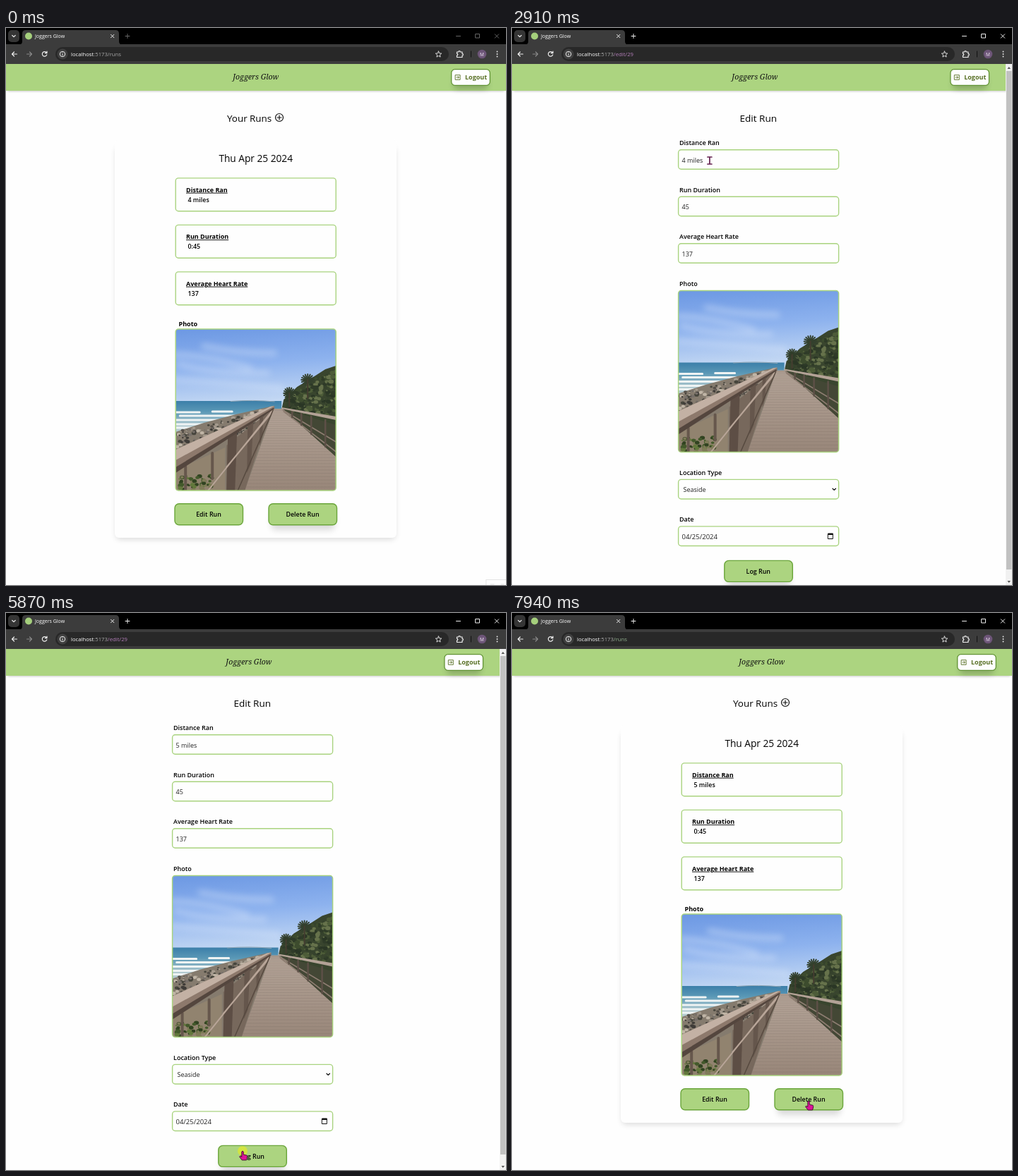
Write an HTML page that moves like this. It is 708 px wide and 790 px high and loops after 8 s.

```html
<!DOCTYPE html>
<html lang="en">
<head>
<meta charset="utf-8">
<title>Joggers Glow</title>
<style>
html, body { margin: 0; width: 100%; height: 100%; overflow: hidden; background: #fefefe; }
svg { display: block; width: 100%; height: 100%; font-family: "Open Sans", "Noto Sans", sans-serif; }
text { white-space: pre; }
.brand { font-family: "Noto Serif", serif; font-style: italic; }
.line { fill: none; stroke-linecap: round; stroke-linejoin: round; }
</style>
</head>
<body>
<svg id="stage" viewBox="0 0 708 790"></svg>
<script>
const LOOP = 8000;
const GREEN = '#acd480';
const NAME = 'Joggers Glow';

// ---- drawing helpers ----
const rect = (x, y, w, h, fill, r = 0, extra = '') =>
  `<rect x="${x}" y="${y}" width="${w}" height="${h}" rx="${r}" fill="${fill}" ${extra}/>`;
const poly = (points, fill, extra = '') => `<polygon points="${points}" fill="${fill}" ${extra}/>`;
const line = (d, color, width = 1, extra = '') =>
  `<path class="line" d="${d}" stroke="${color}" stroke-width="${width}" ${extra}/>`;
const text = (x, y, size, weight, str, extra = '') =>
  `<text x="${x}" y="${y}" font-size="${size}" font-weight="${weight}" ${extra}>${str}</text>`;
const centered = (x, y, size, weight, str, extra = '') =>
  text(x, y, size, weight, str, 'text-anchor="middle" ' + extra);
const group = (id, content, extra = '') => `<g id="${id}" ${extra}>${content}</g>`;
const shadow = (x, y, w, h, blur, alpha) =>
  rect(x, y, w, h, '#000', 5, `opacity="${alpha}" style="filter:blur(${blur}px)"`);
const field = (x, y, h, extra = '') =>
  rect(x, y, 227, h, '#fefefe', 4, `stroke="#a9d37f" stroke-width="1.4" ${extra}`);
const button = (x, y, label, lifted) =>
  (lifted ? shadow(x + 4, y + 10, 89, 27, 5, .15) : '') +
  rect(x, y, 96.5, 30, GREEN, 6, 'stroke="#6aa53a" stroke-width="1.4"') +
  centered(x + 48, y + 18.5, 8.9, 600, label);

let seed = 7;
const random = () => (seed = seed * 16807 % 2147483647) / 2147483647;
const pick = list => list[Math.floor(random() * list.length)];
const repeat = (n, make) => Array.from({ length: n }, (_, i) => make(i)).join('');

// ---- seaside picture, 227 x 229 ----
const DECK = '139,113 152,113 227,181 227,229 98,229';
function seaside() {
  const blob = (x, y, r, color) => `<ellipse cx="${x}" cy="${y}" rx="${r * 1.3}" ry="${r}" fill="${color}"/>`;
  const sky = rect(0, 0, 227, 110, 'url(#sky)') +
    `<g style="filter:blur(5px)" opacity=".4">` +
    line('M0 36Q45 38 105 55M5 50Q60 64 130 62M40 24Q90 35 140 34M0 72Q70 76 150 84', '#dce8fb', 8) + '</g>';
  const sea = rect(0, 102, 150, 60, 'url(#sea)') +
    `<g style="filter:blur(.7px)">` +
    line('M0 118H34M52 117H80M6 123H92M0 129H80M0 135H62M0 140H40', '#eef3f3', 3) + '</g>' +
    line('M78 102.5Q110 100 140 103', '#8fa5b4', 1);
  const shore = poly('0,146 40,133 85,121 138,109 138,160 120,229 0,229', '#857b6e') +
    repeat(190, () => {
      const x = random() * 130;
      return blob(x, 146 - x * .25 + random() * 26, .8 + random() * 1.8,
        pick(['#3f3c38', '#57514a', '#77706a', '#a59b8e', '#c0b5a6', '#47463d']));
    }) +
    poly('0,200 70,168 70,229 0,229', '#91836f') +
    repeat(60, () => blob(5 + random() * 48, 208 + random() * 21, 1 + random() * 2, pick(['#43592b', '#62783c', '#314321', '#7f7b58'])));
  const hill = poly('150,114 153,100 172,82 198,66 212,57 227,52 227,190', '#39452e') +
    repeat(260, () => {
      const x = 156 + random() * 72;
      const top = 100 - (x - 150) * .62;
      return blob(x, top + random() * (122 - top), 1 + random() * 2.2,
        pick(['#2a3625', '#35422c', '#3d4c2e', '#4d5c38', '#66724b', '#2f3b28']));
    }) +
    repeat(16, i => line(`M187 72l${9 * Math.cos(i * .393)} ${8 * Math.sin(i * .393)}`, '#33402d', 2)) +
    repeat(16, i => line(`M161 91l${8 * Math.cos(i * .393)} ${8 * Math.sin(i * .393)}`, '#303d29', 2)) +
    line('M187 72V98M161 91V110', '#443d30', 2);
  const deck = poly(DECK, 'url(#wood)') +
    `<g clip-path="url(#deck)">` +
    repeat(34, i => {
      const y = 114 + 115 * (i / 34) ** 1.5;
      return line(`M90 ${y}H227`, '#74665d', .5, 'opacity=".45"');
    }) + '</g>';
  const rightRail = poly('152,113 227,136 227,181', '#434735') +
    line('M152 115L227 160M153 117L227 174', '#8d7d71', 1.6) +
    line('M165 117V125M178 120V136M192 124V149M212 129V167', '#5d5047', 2.5) +
    poly('150,111 227,124 227,129 150,113', '#b3a296');
  const leftRail =
    poly('138,113 118,165 98,229 72,229 72,165', '#77685c') +
    line('M52 176V212M14 195V229', '#66574c', 4) +
    poly('74,150 87,145 84,229 72,229', '#5d4e45') +
    poly('102,135 110,131 107,190 101,204', '#65564c') +
    poly('119,124 124,121 123,152 119,166', '#65564c') +
    line('M138 114L46 229M138 116L72 196', '#b8a598', 2) +
    line('M138 115L88 229', '#56493f', 1.5) +
    poly('0,171 134,110 140,109 140,113 0,202', '#8d796c') +
    poly('0,171 134,110 140,109 0,186', '#c3b1a4') +
    poly('0,196 138,112 140,113 0,204', '#54463e');
  return sky + sea + shore + hill + deck + rightRail + leftRail;
}

const photo = (x, y) =>
  `<use href="#photo" x="${x}" y="${y}"/>` +
  rect(x, y, 227, 229, 'none', 4, 'stroke="#a9d37f" stroke-width="1.5"');

const defs = `<defs>
  <linearGradient id="sky" x2=".15" y2="1"><stop stop-color="#6c98e3"/><stop offset=".5" stop-color="#8db2ee"/><stop offset="1" stop-color="#c5d9f3"/></linearGradient>
  <linearGradient id="sea" x2="0" y2="1"><stop stop-color="#3c7fa9"/><stop offset=".25" stop-color="#5a98b6"/><stop offset=".6" stop-color="#b4cbd0"/></linearGradient>
  <linearGradient id="wood" x2="0" y2="1"><stop stop-color="#b5a599"/><stop offset="1" stop-color="#988679"/></linearGradient>
  <clipPath id="frame">${rect(0, 0, 227, 229, '#000', 4)}</clipPath>
  <clipPath id="deck">${poly(DECK, '#000')}</clipPath>
  <g id="photo" clip-path="url(#frame)">${seaside()}</g>
</defs>`;

// ---- browser window ----
const browser =
  rect(0, 0, 708, 24, '#000') + rect(0, 23, 708, 28, '#3c3c3c') +
  rect(3, 3, 16, 17, '#353535', 5) + line('M8.8 10.5l2.2 2.2 2.2-2.2', '#eee', 1.2) +
  `<path d="M19 24q4-1 4-5V8q0-5 5-5h127q5 0 5 5v11q0 4 4 5z" fill="#3c3c3c"/>` +
  `<circle cx="32" cy="11.5" r="5" fill="#a5cf7c"/>` +
  text(41, 14.3, 7, 400, NAME, 'fill="#fff"') +
  line('M148.5 9.3l4.4 4.4M152.9 9.3l-4.4 4.4', '#eee') +
  group('controls', line('M169 11.5h6M172 8.5v6M637.5 11.5h6M665 8.5h5.5v5.5h-5.5zM692.3 8.8l5.4 5.4M697.7 8.8l-5.4 5.4', 'currentColor')) +
  line('M15.5 37H8.5M11.5 34l-3 3 3 3', '#eee', 1.2) +
  line('M29.5 37h7M33.5 34l3 3-3 3', '#888', 1.2) +
  line('M57.5 35.2a3.3 3.3 0 1 0 .3 2.6M58 33v2.6h-2.6', '#eee', 1.2) +
  rect(70, 27, 557, 20, '#282828', 10) +
  `<circle cx="80" cy="37" r="7.5" fill="#3f3f3f"/><circle cx="80" cy="37" r="3.7" fill="none" stroke="#eee"/>` +
  line('M80 36.8v2M80 35v.1', '#eee') +
  text(92, 39.8, 7.7, 400, 'localhost<tspan fill="#a8a8a8">:5173</tspan><tspan id="path"></tspan>', 'fill="#fff"') +
  line('M612.5 33l1.2 2.8 3 .3-2.3 2 .7 3-2.6-1.6-2.6 1.6.7-3-2.3-2 3-.3z', '#ddd') +
  line('M638.5 34h2.2a1.3 1.3 0 0 1 2.6 0h2.7v2.4a1.3 1.3 0 0 1 0 2.6v2.5h-7.5v-2.6a1.3 1.3 0 0 0 0-2.6z', '#eee', 1.2) +
  line('M658.5 33v8', '#111') +
  `<circle cx="674" cy="37" r="6.3" fill="#6d5578"/>` + centered(674, 39.5, 6.5, 400, 'M', 'fill="#f2e9f5"') +
  line('M695.5 33.5v.1M695.5 37v.1M695.5 40.5v.1', '#eee', 1.8);

const header = shadow(0, 56, 708, 34, 1.5, .2) + rect(0, 51, 708, 38, GREEN);
const nav = centered(353.7, 73.3, 10.6, 400, NAME, 'class="brand" fill="#111"') +
  shadow(634, 66, 48, 21, 4.5, .2) +
  rect(630.7, 58.7, 54.6, 22.6, '#fefefe', 5, 'stroke="#619334" stroke-width="1.3"') +
  line('M636.5 66.7h6.6v6.6h-6.6zM638 70h3.4M640 68.5l1.5 1.5-1.5 1.5', '#576f23', .9) +
  text(650, 73.4, 9, 700, 'Logout', 'fill="#576f23"');

// ---- pages ----
const stat = (i, label, value, id = '') => {
  const y = 212.9 + i * 66.5;
  return field(240.2, y, 46.8) +
    text(255, y + 19.8, 9, 700, label, 'text-decoration="underline"') +
    text(257.5, y + 34, 8.9, 600, value, `id="${id}"`);
};
const runsPage =
  text(313, 132.6, 13.4, 500, 'Your Runs') +
  `<circle cx="387" cy="127" r="5.5" fill="none" stroke="#111" stroke-width="1.2"/>` +
  line('M384 127h6M387 124v6', '#111', 1.2) +
  shadow(156, 170, 395, 555, 4, .15) + rect(154, 158, 399, 565, '#fefefe', 6) +
  centered(353.7, 189.6, 13.7, 500, 'Thu Apr 25 2024') +
  stat(0, 'Distance Ran', '4 miles', 'ran') + stat(1, 'Run Duration', '0:45') + stat(2, 'Average Heart Rate', '137') +
  text(244.5, 422.6, 9, 700, 'Photo') + photo(240.2, 427) +
  button(239, 674.7, 'Edit Run') + button(372, 674.7, 'Delete Run', true);

const input = (y, label, value, x = 240.5, id = '', fieldId = '') =>
  text(237, y - 6.5, 9, 600, label) + field(235.6, y, 27.6, `id="${fieldId}"`) +
  text(x, y + 18, 9, 400, value, `id="${id}" fill="#222"`);
const editPage =
  centered(348.8, 132.6, 13.5, 500, 'Edit Run') +
  input(172.7, 'Distance Ran', '4 miles', 240.5, 'distance', 'focus') +
  group('selection', rect(241, 181, 5, 12.5, '#3367c8') + text(240.5, 190.7, 9, 400, '4', 'fill="#fff"')) +
  group('caret', line('M246.2 181.5v11', '#222', .8)) +
  input(239.2, 'Run Duration', '45') + input(305.7, 'Average Heart Rate', '137') +
  text(237, 365.7, 9, 600, 'Photo') + photo(235.6, 372.5) +
  input(640.4, 'Location Type', 'Seaside', 242.5) + line('M454 653.2l2.2 2.2 2.2-2.2', '#111', 1.3) +
  input(706.9, 'Date', '<tspan font-size="9.5">04/25/2024</tspan>') +
  line('M447.7 717.5h6.6v7h-6.6z', '#111') + rect(447.5, 716.5, 7, 2.5, '#111') +
  button(300.8, 755.4, 'Log Run', true) +
  rect(699, 51, 9, 739, '#f1f1f1') + rect(700, 61, 7.5, 707, '#c1c1c1') +
  poly('701.5,58 706,58 703.7,55', '#555') + poly('701.5,784 706,784 703.7,787', '#555');

const spinner = repeat(12, i =>
  `<ellipse cx="377.5" cy="177" rx="7.3" ry="3.6" fill="#a6d07a" opacity="${1 - i / 11}" transform="rotate(${-30 * i} 353.7 177)"/>`);

const cursors =
  group('arrow', `<path d="M0 0V11.2L2.6 9 4.3 12.6 6 11.7 4.4 8.2H7.6Z" fill="#cf2a98" stroke="#2b1a2c" stroke-width=".9"/>`) +
  group('ibeam', line('M-3-5H3M0-5V5M-3 5H3', '#64214f', 1.7)) +
  group('hand', `<path d="M-1.2 1Q0-1 1.2 1V5l5 1.3Q7 7 6.4 10L5.5 13H-.8L-4.5 8Q-4 6.5-1.2 8.2Z" fill="#dc1596" stroke="#3a1030" stroke-width=".9"/>`);

const stage = document.getElementById('stage');
stage.innerHTML = defs + rect(0, 0, 708, 790, '#fefefe') +
  group('runs', runsPage) + header + group('nav', nav) + group('edit', editPage) +
  group('spinner', spinner) + browser +
  group('popup', rect(679.8, 782.5, 40, 20, '#fefefe', 0, 'stroke="#e4e4e4"') + line('M686 789h5M701 789h4', '#e4e4e4')) +
  group('ripple', '<circle r="7" fill="#d8e637" opacity=".85"/>') + group('cursor', cursors);

// ---- timeline ----
const at = {};
stage.querySelectorAll('[id]').forEach(el => at[el.id] = el);
const show = (id, on) => at[id].style.display = on ? '' : 'none';
const within = (t, from, to) => t >= from && t < to;

// time, x, y
const route = [
  [270, 643, 783], [620, 480, 742], [1070, 287, 697], [1610, 287, 697], [1880, 274, 672],
  [2290, 276, 507], [2420, 276, 490], [2840, 280, 190], [2910, 280, 188], [3180, 250, 188],
  [3550, 247, 188], [3900, 238, 190], [4080, 238, 190], [4500, 212, 300], [4840, 180, 403],
  [5000, 172, 425], [5300, 235, 600], [5600, 333, 758], [5670, 335, 763], [5940, 335, 763],
  [6500, 225, 589], [6830, 223, 587], [7080, 132, 480], [7280, 180, 348], [7590, 335, 546],
  [7940, 420, 692], [LOOP, 420, 692]
];
function pointer(t) {
  const next = Math.max(1, route.findIndex(p => p[0] > t));
  const [t0, x0, y0] = route[next - 1], [t1, x1, y1] = route[next];
  const k = Math.max(0, (t - t0) / (t1 - t0));
  return [x0 + (x1 - x0) * k, y0 + (y1 - y0) * k];
}
const over = (x, y, left, top, w, h) => x > left && x < left + w && y > top && y < top + h;

function render(t) {
  const editUrl = within(t, 1350, 6080);
  const editing = within(t, 2150, 6080);
  const listing = t < 1350 || t >= 6570;
  const focused = within(t, 3300, 5800);
  const selected = within(t, 3650, 4250);
  const typed = t >= 4400;

  show('popup', t < 70);
  at.controls.style.color = t < 1140 ? '#666' : '#eee';
  at.path.textContent = editUrl ? '/edit/29' : '/runs';
  at.path.setAttribute('fill', editUrl ? '#b47fba' : t < 1350 ? '#a8a8a8' : '#93b390');
  show('runs', listing);
  show('edit', editing);
  at.nav.setAttribute('transform', `translate(${editing ? -9.8 : 0})`);
  at.ran.textContent = `${t < 1350 ? 4 : 5} miles`;

  at.distance.textContent = `${typed ? 5 : 4} miles`;
  at.focus.setAttribute('stroke', focused ? '#111' : '#a9d37f');
  show('selection', selected);
  show('caret', focused && !selected && (t - 4400) % 1000 < 500);

  show('spinner', within(t, 6080, 6570));
  const turn = 30 * Math.floor((t - 6500) / (1000 / 12) + .01);
  at.spinner.setAttribute('transform', `rotate(${turn} 353.7 177)`);

  const [x, y] = pointer(t);
  const onButton = listing && (over(x, y, 239, 674, 97, 31) || over(x, y, 372, 674, 97, 31)) ||
    editing && over(x, y, 300, 755, 97, 31);
  const onText = editing && [172, 239, 305].some(top => over(x, y, 235, top, 228, 28));
  show('cursor', t >= 270);
  at.cursor.setAttribute('transform', `translate(${x} ${y})`);
  show('hand', onButton);
  show('ibeam', onText);
  show('arrow', !onButton && !onText);
  show('ripple', within(t, 1140, 1350) || within(t, 5800, 6010));
  at.ripple.setAttribute('transform', `translate(${x} ${y})`);
}

const start = performance.now();
function tick() {
  render((performance.now() - start) % LOOP);
  requestAnimationFrame(tick);
}
tick();
</script>
</body>
</html>
```
